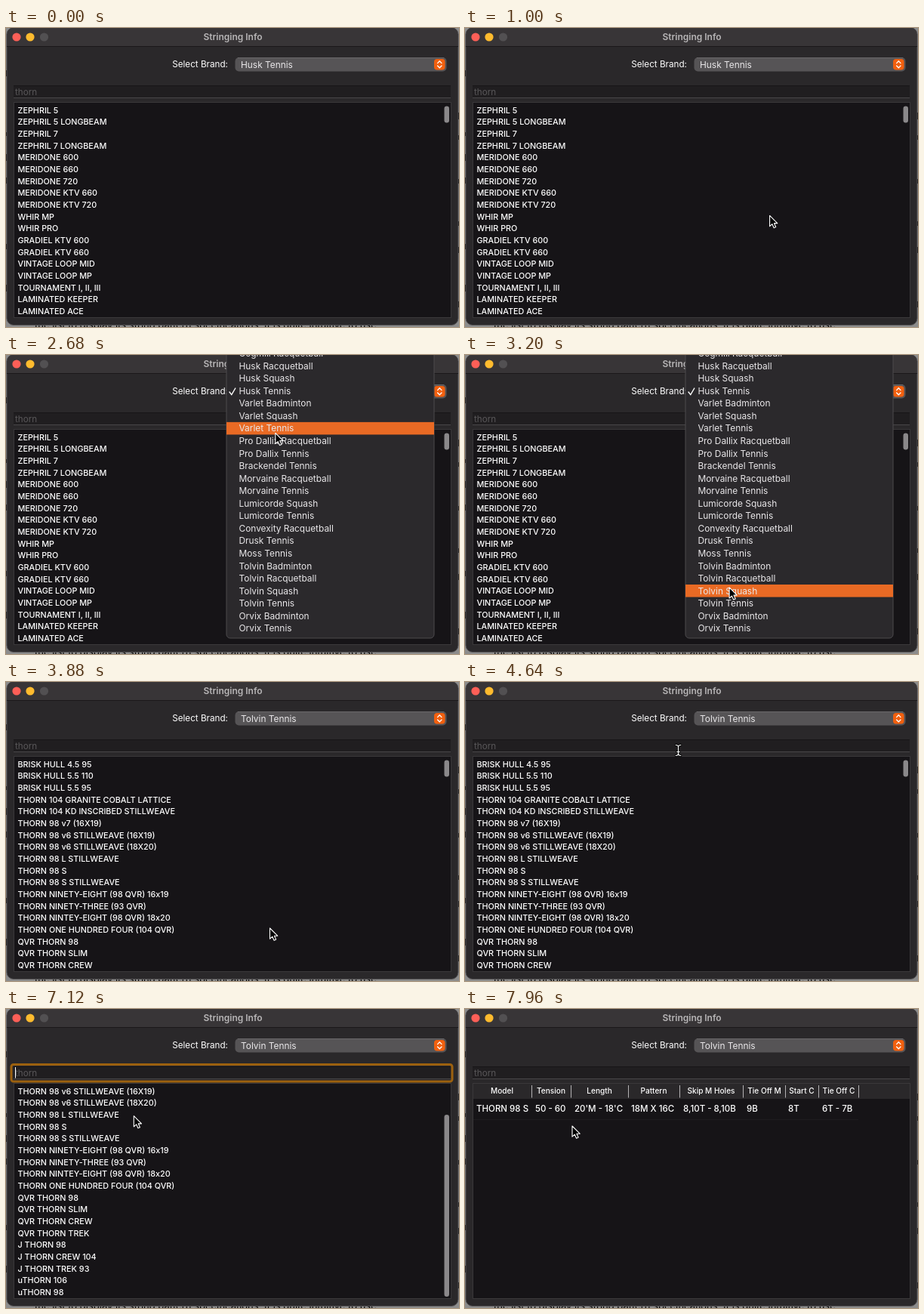
Write an HTML page that moves like this. It is 600x396 px and loops after 8 s.

```html
<!DOCTYPE html>
<html lang="en">
<head>
<meta charset="utf-8">
<title>Stringing Info</title>
<style>
  html, body { margin: 0; width: 100%; height: 100%; overflow: hidden; background: #8c8c8c; }
  svg { display: block; width: 600px; height: 396px; }
  text { font-family: Inter, "Open Sans", sans-serif; fill: #fff; white-space: pre; }
  .title { font-size: 12px; font-weight: 600; fill: #b7b5b6; }
  .label { font-size: 11.7px; }
  .row { font-size: 10.8px; font-weight: 450; }
  .item { font-size: 11.9px; fill: #e9e7e9; }
  .head { font-size: 10.1px; font-weight: 500; }
  .cell { font-size: 11.5px; font-weight: 500; }
  .page { font-size: 13px; fill: #000; }
</style>
</head>
<body>
<svg id="stage" viewBox="0 0 600 396">
  <rect width="600" height="396" fill="#8c8c8c"/>
  <text class="page" x="38" y="398">the list to display its string pattern specifications. It is quite intuitive to use</text>
  <path d="M0 56v8M0 138v5M0 167v9M0 198v8M0 286v7M0 340v9M600 112v9M600 142v6M600 200v6M600 256v6M600 290v8M600 362v8" stroke="#000" stroke-width="2"/>

  <rect x="1" y="-.5" width="598" height="394" rx="9" fill="#2a282a" stroke="#565456"/>
  <path d="M1.5 24V9q0-9 9-9h579q9 0 9 9v15z" fill="#383537"/>
  <path d="M1 24.5h598" stroke="#1a181a"/>
  <circle cx="14" cy="12" r="5.6" fill="#fd5f57"/>
  <circle cx="32" cy="12" r="5.6" fill="#febb2e"/>
  <circle cx="50.5" cy="12" r="5.6" fill="#525052"/>
  <text class="title" x="300.5" y="16" text-anchor="middle">Stringing Info</text>

  <text class="label" x="294" y="52" text-anchor="end">Select Brand:</text>
  <rect x="303.5" y="39" width="280" height="18.5" rx="5" fill="#565456"/>
  <path d="M307 39.5h273" stroke="#6a686a"/>
  <text class="item" id="brand" x="311" y="52.6"></text>
  <rect x="567" y="41" width="14.5" height="14.5" rx="4" fill="#f2600f"/>
  <path d="M571.6 46.6l2.7-2.8 2.7 2.8M571.6 50l2.7 2.8 2.7-2.8" fill="none" stroke="#fff" stroke-width="1.3" stroke-linecap="round" stroke-linejoin="round"/>

  <rect x="10" y="76" width="579" height="17" fill="#201e20"/>
  <path d="M10 76.5h579" stroke="#181618"/>
  <path d="M10 92.5h579" stroke="#484648"/>
  <text class="label" id="query" x="12" y="89.2"></text>
  <path id="caret" d="M12.5 77v14.5" stroke="#fff"/>
  <rect id="ring" x="7" y="73.5" width="584" height="22.5" rx="3" fill="none" stroke="#9c610f" stroke-width="3"/>

  <rect x="10.5" y="98.5" width="579" height="285" fill="#161417" stroke="#3a383a"/>
  <g id="list"></g>
  <rect id="thumb" x="580.5" width="6.5" rx="3.25" fill="#8a888a"/>
  <g id="table"></g>
  <g id="menu"></g>

  <g id="arrow">
    <path d="M0 0V14.2L3.3 11.2L5.6 16.2L8.1 15.1L5.9 10.2H10.2Z" fill="#000" stroke="#fff" stroke-width="1.1" stroke-linejoin="round"/>
  </g>
  <g id="beam" fill="none" stroke-linecap="round">
    <path d="M-3.3-7q3.3 0 3.3 2.5v9q0 2.5-3.3 2.5M3.3-7q-3.3 0-3.3 2.5M0 4.5q0 2.5 3.3 2.5M-1.8 2h3.6" stroke="#000" stroke-width="3"/>
    <path d="M-3.3-7q3.3 0 3.3 2.5v9q0 2.5-3.3 2.5M3.3-7q-3.3 0-3.3 2.5M0 4.5q0 2.5 3.3 2.5M-1.8 2h3.6" stroke="#fff" stroke-width="1.2"/>
  </g>
</svg>
<script>
const LOOP = 8000;
const ROW_H = 15.65, ITEM_H = 16.55, ITEM_TOP = -2.15;
const QUERY = "thorn";
const T = { menu: 1960, pick: 3520, focus: 4960, type: 5200, key: 100, enter: 5760, move: 6620, table: 7560 };

const brands = ["Cogmill Racquetball", "Husk Racquetball", "Husk Squash", "Husk Tennis",
  "Varlet Badminton", "Varlet Squash", "Varlet Tennis", "Pro Dallix Racquetball", "Pro Dallix Tennis",
  "Brackendel Tennis", "Morvaine Racquetball", "Morvaine Tennis", "Lumicorde Squash", "Lumicorde Tennis",
  "Convexity Racquetball", "Drusk Tennis", "Moss Tennis", "Tolvin Badminton", "Tolvin Racquetball",
  "Tolvin Squash", "Tolvin Tennis", "Orvix Badminton", "Orvix Tennis"];

const huskModels = ["ZEPHRIL 5", "ZEPHRIL 5 LONGBEAM", "ZEPHRIL 7", "ZEPHRIL 7 LONGBEAM",
  "MERIDONE 600", "MERIDONE 660", "MERIDONE 720", "MERIDONE KTV 660", "MERIDONE KTV 720",
  "WHIR MP", "WHIR PRO", "GRADIEL KTV 600", "GRADIEL KTV 660", "VINTAGE LOOP MID", "VINTAGE LOOP MP",
  "TOURNAMENT I, II, III", "LAMINATED KEEPER", "LAMINATED ACE"];

const tolvinModels = ["BRISK HULL 4.5 95", "BRISK HULL 5.5 110", "BRISK HULL 5.5 95",
  "THORN 104 GRANITE COBALT LATTICE", "THORN 104 KD INSCRIBED STILLWEAVE", "THORN 98 v7 (16X19)",
  "THORN 98 v6 STILLWEAVE (16X19)", "THORN 98 v6 STILLWEAVE (18X20)", "THORN 98 L STILLWEAVE",
  "THORN 98 S", "THORN 98 S STILLWEAVE", "THORN NINETY-EIGHT (98 QVR) 16x19",
  "THORN NINETY-THREE (93 QVR)", "THORN NINTEY-EIGHT (98 QVR) 18x20",
  "THORN ONE HUNDRED FOUR (104 QVR)", "QVR THORN 98", "QVR THORN SLIM", "QVR THORN CREW",
  "QVR THORN TREK", "J THORN 98", "J THORN CREW 104", "J THORN TREK 93", "uTHORN 106", "uTHORN 98"];

// heading, heading centre, cell text, cell x, right divider
const columns = [
  ["Model", 49, "THORN 98 S", 15, 88], ["Tension", 114, "50 - 60", 93, 140],
  ["Length", 178, "20'M - 18'C", 145, 216], ["Pattern", 250, "18M X 16C", 220, 284],
  ["Skip M Holes", 326, "8,10T - 8,10B", 289, 368], ["Tie Off M", 396.5, "9B", 373, 424],
  ["Start C", 446, "8T", 428, 468], ["Tie Off C", 495, "6T - 7B", 473, 521]];

// pointer rests: time, x, y
const path = [[720, 420, 331], [1500, 364.5, 52], [1900, 364.5, 52], [2200, 358.5, 53], [2430, 358.5, 53],
  [3345, 349.5, 326], [4060, 349.5, 326], [4600, 282.5, 90.5], [4680, 282.5, 90.5], [4880, 281, 87],
  [T.move, 281, 87], [7320, 142, 155]];

const $ = id => document.getElementById(id);
const show = (el, on) => el.setAttribute("visibility", on ? "visible" : "hidden");

function add(parent, tag, attrs, text) {
  const el = document.createElementNS("http://www.w3.org/2000/svg", tag);
  for (const k in attrs) el.setAttribute(k, attrs[k]);
  if (text) el.textContent = text;
  return parent.appendChild(el);
}

const rows = Array.from({ length: 18 }, (_, i) =>
  add($("list"), "text", { class: "row", x: 15.5, y: 112.8 + i * ROW_H }));

const itemY = i => ITEM_TOP + i * ITEM_H;
const menu = $("menu");
add(menu, "rect", { x: 292, y: -20, width: 275, height: 395, rx: 5, fill: "#2b292c", stroke: "#4c4a4d" });
const glow = add(menu, "rect", { x: 292, width: 275, height: ITEM_H, fill: "#e96a24" });
brands.forEach((name, i) => add(menu, "text", { class: "item", x: 308.5, y: itemY(i) + 4.3 }, name));
add(menu, "path", { d: "M296 49l2.8 3.6 5-8.6", fill: "none", stroke: "#fff", "stroke-width": 1.4, "stroke-linecap": "round" });

const table = $("table");
add(table, "rect", { x: 11, y: 99, width: 578, height: 20, fill: "#2a282a" });
add(table, "path", { d: "M11 146.5h510", stroke: "#1e1c1f" });
for (const [name, cx, value, x, edge] of columns) {
  add(table, "text", { class: "head", x: cx, y: 112, "text-anchor": "middle" }, name);
  add(table, "text", { class: "cell", x, y: 136 }, value);
  add(table, "path", { d: `M${edge}.5 101v16.5`, stroke: "#b4b2b4" });
}

function pointer(t) {
  const i = path.findIndex(p => p[0] > t);
  if (i < 0) return path[path.length - 1].slice(1);
  if (i === 0) return path[0].slice(1);
  const [t0, x0, y0] = path[i - 1], [t1, x1, y1] = path[i];
  const u = (t - t0) / (t1 - t0), e = u * u * (3 - 2 * u);
  return [x0 + (x1 - x0) * e, y0 + (y1 - y0) * e];
}

function drawList(t) {
  const filtered = t >= T.enter;
  const models = t < T.pick ? huskModels : filtered ? tolvinModels.slice(6) : tolvinModels;
  rows.forEach((row, i) => {
    if (row.textContent !== models[i]) row.textContent = models[i];
  });
  $("thumb").setAttribute("y", filtered ? 140 : 103.5);
  $("thumb").setAttribute("height", filtered ? 241 : 22);
  const open = t >= T.table;
  show($("list"), !open);
  show($("thumb"), !open);
  show(table, open);
}

function drawField(t) {
  const focused = t >= T.focus && t < T.table;
  const count = t < T.type || t >= T.enter ? 0 : Math.min(QUERY.length, 1 + Math.floor((t - T.type) / T.key));
  const query = $("query");
  query.textContent = count ? QUERY.slice(0, count) : QUERY;
  query.style.fill = count ? "#fff" : "#595759";
  const since = t < T.type ? t - T.focus : t - T.enter;
  show($("caret"), focused && (count > 0 || since % 1060 < 530));
  $("caret").setAttribute("transform", `translate(${count ? query.getComputedTextLength() : 0} 0)`);
  show($("ring"), focused);
  $("ring").setAttribute("opacity", Math.min(1, Math.max(0, (t - T.focus + 40) / 160)));
}

function drawMenu(t, y) {
  show(menu, t >= T.menu && t < T.pick + 120);
  menu.setAttribute("opacity", t < T.pick ? 1 : Math.max(0, 1 - (t - T.pick) / 120));
  const i = Math.round((y - ITEM_TOP) / ITEM_H);
  glow.setAttribute("y", itemY(i) - ITEM_H / 2);
  $("brand").textContent = t < T.pick ? "Husk Tennis" : "Tolvin Tennis";
}

function drawPointer(t, x, y) {
  const visible = t >= 720 && (t < T.type || t >= T.move);
  const menuOpen = t >= T.menu && t < T.pick;
  const overField = !menuOpen && y > 76 && y < 94;
  show($("arrow"), visible && !overField);
  show($("beam"), visible && overField);
  for (const id of ["arrow", "beam"]) $(id).setAttribute("transform", `translate(${x} ${y})`);
}

function draw(t) {
  const [x, y] = pointer(t);
  drawList(t);
  drawField(t);
  drawMenu(t, y);
  drawPointer(t, x, y);
}

const start = performance.now();
function tick() {
  draw((performance.now() - start) % LOOP);
  requestAnimationFrame(tick);
}
tick();
</script>
</body>
</html>
```
